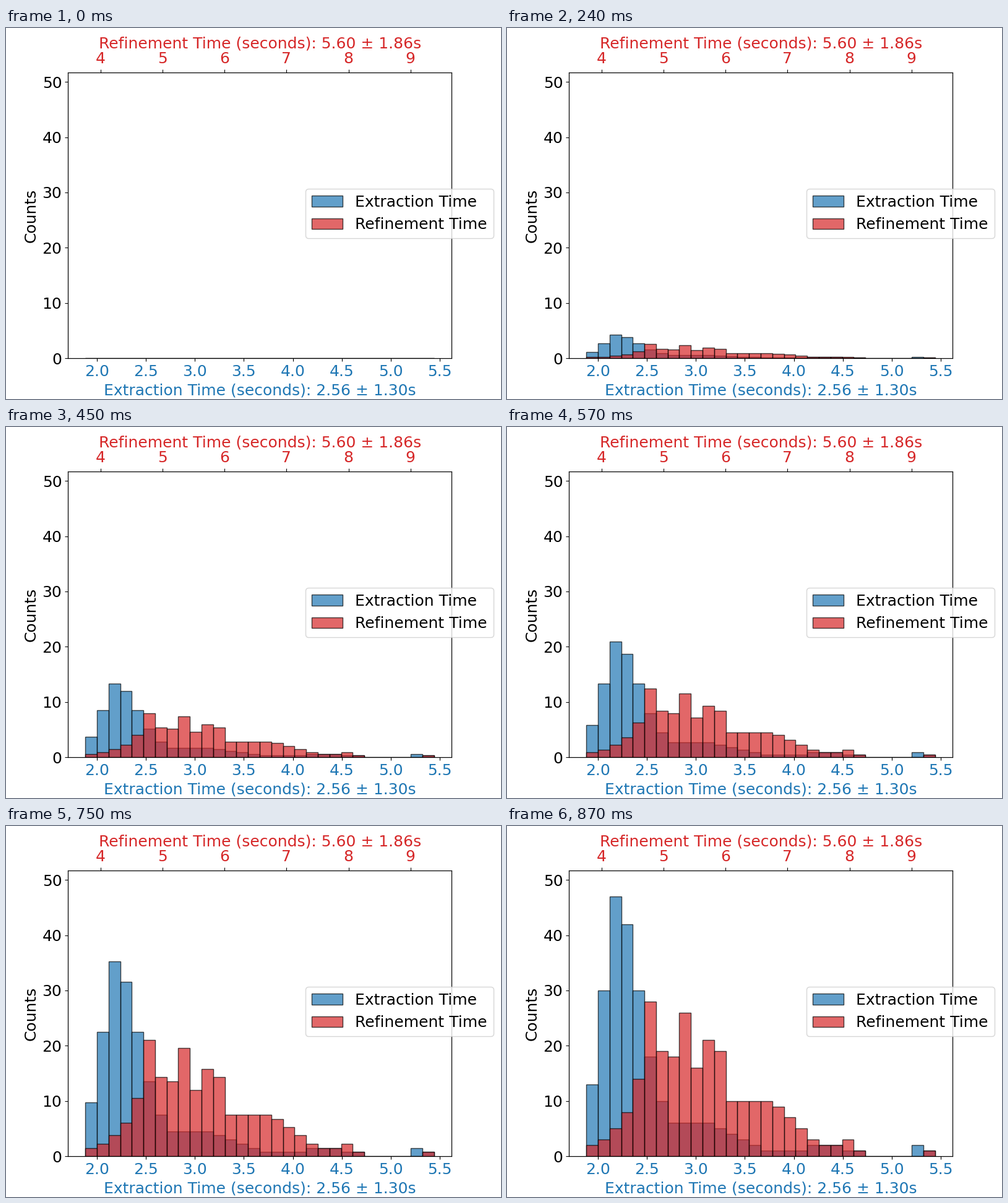
Recreate the animation shown at these times as a matplotlib script. Size 800 by 600 pixels, loop 900 ms.

```python
import numpy as np
import matplotlib.pyplot as plt
from matplotlib.animation import FuncAnimation

FRAMES = 30
INTERVAL = 30
BINS = np.arange(30)
BLUE, RED = "tab:blue", "tab:red"

plt.rcParams.update({"font.family": "DejaVu Sans", "font.size": 18})


def bump(center, width, height):
    return height * np.exp(-((BINS - center) / width) ** 2)


# Main peak behind a straight rise, then a shoulder and two small tails.
extraction = np.round(np.minimum(
    13 + 17 * BINS,
    bump(2, 2.9, 47) + bump(9.5, 4, 6) + bump(20, 3, 2) + bump(28.3, 0.6, 2)))

# Two broad humps with three narrow peaks on top, and a thin tail.
refinement = np.round(
    bump(7, 4.5, 17) + bump(15, 4, 9)
    + bump(5, 0.8, 14) + bump(8, 0.6, 9) + bump(10.5, 0.7, 13.5)
    + bump(22, 1.4, 2.2) + bump(29, 0.4, 1))


def draw_bars(ax, lo, hi, color, label):
    """Draw empty histogram bars between lo and hi with a 5% margin."""
    edges = np.linspace(lo, hi, len(BINS) + 1)
    bars = ax.bar(edges[:-1], np.zeros(len(BINS)), width=np.diff(edges),
                  align="edge", color=color, edgecolor="black", alpha=0.7,
                  label=label)
    margin = 0.05 * (hi - lo)
    ax.set_xlim(lo - margin, hi + margin)
    return bars


def label_axis(ax, text, ticks, color, **place):
    ax.set_xlabel(text, color=color, **place)
    ax.set_xticks(ticks)
    ax.tick_params(axis="x", labelcolor=color)


fig, ax = plt.subplots(figsize=(8, 6), dpi=100)
fig.subplots_adjust(left=0.125, right=0.9, bottom=0.11, top=0.88)
top = ax.twiny()

blue_bars = draw_bars(ax, 1.8818, 5.4415, BLUE, "Extraction Time")
red_bars = draw_bars(top, 3.7543, 9.3794, RED, "Refinement Time")

label_axis(ax, "Extraction Time (seconds): 2.56 ± 1.30s",
           np.arange(2, 5.6, 0.5), BLUE, labelpad=4.7)
label_axis(top, "Refinement Time (seconds): 5.60 ± 1.86s",
           np.arange(4, 10), RED, x=0.5016)
ax.set_ylabel("Counts")
ax.set_ylim(0, 1.1 * extraction.max())
ax.set_yticks(range(0, 51, 10))
fig.legend(loc="center right")


def update(frame):
    # Bars grow with a quadratic ease-in.
    growth = ((frame + 1) / FRAMES) ** 2
    for bars, counts in ((blue_bars, extraction), (red_bars, refinement)):
        for bar, count in zip(bars, counts):
            bar.set_height(count * growth)
    return [*blue_bars, *red_bars]


anim = FuncAnimation(fig, update, frames=FRAMES, interval=INTERVAL,
                     repeat=True, repeat_delay=0)
plt.show()
```
